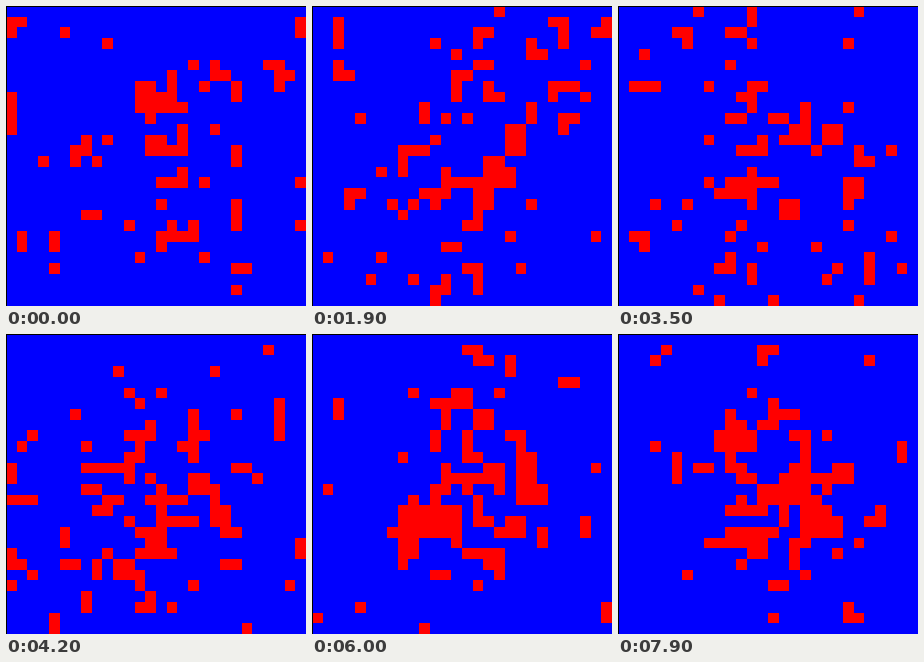
Animation, 300 px wide and 300 px high, one loop 8000 ms. Source, as a matplotlib script:

```python
import numpy as np
import matplotlib.pyplot as plt
from matplotlib.animation import FuncAnimation
from matplotlib.colors import ListedColormap
from matplotlib.patches import Rectangle

SIZE, CELLS, FRAMES, STEP = 300, 28, 80, 100
REFRESH = 0.6   # share of cells redrawn at each step
BLEND = 0.25    # pull of the four neighbours, which makes cells clump

rows, cols = np.mgrid[:CELLS, :CELLS]
radius = np.hypot((cols - 14) / 7.3, (rows - 14.3) / 9.6)
core = 1 / (1 + np.exp(8 * (radius - 0.95)))


def ring(col, row, r):
    distance = np.hypot(cols - col, rows - row)
    return np.exp(-((distance - r) / 1.5) ** 2)


loops = np.maximum(ring(14.3, 10, 4.2), ring(14, 18.8, 4.4))


def smoothstep(start, end, t):
    s = np.clip((t - start) / (end - start), 0, 1)
    return s * s * (3 - 2 * s)


def threshold(step):
    """Noise level above which a cell lights up."""
    late = smoothstep(48, 72, step)
    outside = 1.42 + 0.58 * late
    inside = 0.42 - 0.12 * late
    return outside + (inside - outside) * core - 0.7 * late * loops


def clump(noise):
    near = sum(np.roll(noise, d, axis) for d in (-1, 1) for axis in (0, 1))
    return (noise + BLEND * near) / np.sqrt(1 + 4 * BLEND ** 2)


def simulate():
    rng = np.random.default_rng(28)
    noise = rng.standard_normal((CELLS, CELLS))
    grids = []
    for step in range(FRAMES):
        grids.append(clump(noise) > threshold(step))
        fresh = rng.random(noise.shape) < REFRESH
        noise = np.where(fresh, rng.standard_normal(noise.shape), noise)
    return grids


grids = simulate()

fig = plt.figure(figsize=(SIZE / 100, SIZE / 100), dpi=100)
ax = fig.add_axes([0, 0, 1, 1])
ax.axis("off")
image = ax.imshow(grids[0], cmap=ListedColormap(["#0000ff", "#ff0000"]),
                  vmin=0, vmax=1, interpolation="nearest",
                  extent=(0, SIZE, SIZE, 0), aspect="auto")
for w, h in ((1, SIZE), (SIZE, 1)):
    ax.add_patch(Rectangle((0, 0), w, h, color="black", lw=0, antialiased=False))


def update(step):
    image.set_data(grids[step])
    return [image]


anim = FuncAnimation(fig, update, frames=FRAMES, interval=STEP,
                     repeat=True, repeat_delay=0)
plt.show()
```
